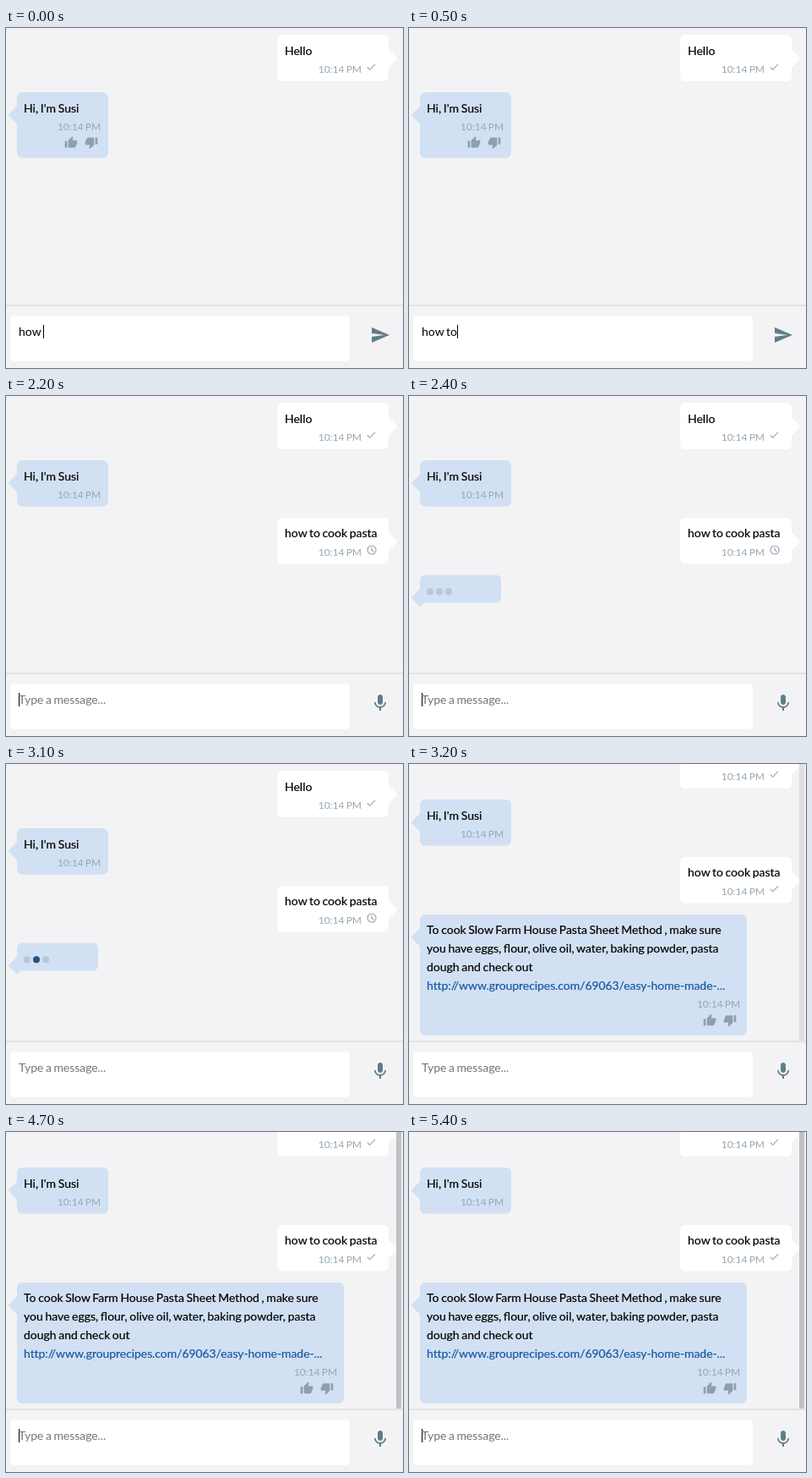
These frames come from a looping animation (470 by 402 pixels, 7.5 s). An HTML page:

```html
<!DOCTYPE html>
<html lang="en">
<head>
<meta charset="utf-8">
<title>Chat</title>
<style>
html, body { margin: 0; width: 100%; height: 100%; overflow: hidden; background: #f3f3f5; }
body { position: relative; font: 14px/20px Lato, sans-serif; word-spacing: -.95px; color: #000; }
svg { position: absolute; left: 0; top: 0; display: block; }
text { font: 14px Lato, sans-serif; fill: #000; stroke: #000; stroke-width: .2px; white-space: pre; }
.time { font-size: 12px; fill: #96a7b4; stroke: none; text-anchor: end; }
.bot { fill: #d1e0f3; }
.me { fill: #fff; }
.thumbs { fill: #8e9fae; }
.tick { fill: #94a5b1; }
.link { fill: #16599f; stroke: #16599f; letter-spacing: -.075px; }
.dot { fill: #b7c6d8; }
#input { position: absolute; left: 15px; top: 349px; height: 20px; white-space: pre; }
#hint { color: #757575; letter-spacing: -.05px; }
#caret { display: inline-block; width: 1px; height: 16px; margin-right: -1px; vertical-align: -3px; background: #000; }
</style>
</head>
<body>
<svg width="470" height="402" viewBox="0 0 470 402">
  <defs>
    <clipPath id="view"><rect width="470" height="327"/></clipPath>
    <rect id="tail" x="-7.5" y="-7.5" width="15" height="15" transform="rotate(45)"/>
    <g id="thumbs">
      <path transform="scale(.667)" d="M1 21h4V9H1v12zm22-11c0-1.1-.9-2-2-2h-6.31l.95-4.57.03-.32c0-.41-.17-.79-.44-1.06L14.17 1 7.59 7.59C7.22 7.95 7 8.45 7 9v10c0 1.1.9 2 2 2h9c.83 0 1.54-.5 1.84-1.22l3.02-7.05c.09-.23.14-.47.14-.73v-2z"/>
      <path transform="translate(24) scale(.667)" d="M15 3H6c-.83 0-1.54.5-1.84 1.22l-3.02 7.05c-.09.23-.14.47-.14.73v2c0 1.1.9 2 2 2h6.31l-.95 4.57-.03.32c0 .41.17.79.44 1.06L9.83 23l6.59-6.59c.36-.36.58-.86.58-1.41V5c0-1.1-.9-2-2-2zm4 0v12h4V3h-4z"/>
    </g>
    <path id="tick" transform="scale(.57)" d="M9 16.2L4.8 12l-1.4 1.4L9 19 21 7l-1.4-1.4L9 16.2z"/>
  </defs>

  <g clip-path="url(#view)">
    <g id="list">
      <g transform="translate(321 8)">
        <use href="#tail" class="me" transform="translate(132 28)"/>
        <rect class="me" width="132" height="55" rx="6"/>
        <text x="9" y="24">Hello</text>
        <text class="time" x="100" y="45">10:14 PM</text>
        <use href="#tick" class="tick" transform="translate(104.4 31.2)"/>
      </g>

      <g transform="translate(13 76)">
        <use href="#tail" class="bot" transform="translate(0 27)"/>
        <rect id="greet" class="bot" width="108" height="77.5" rx="6"/>
        <text x="8" y="24">Hi, I'm Susi</text>
        <text class="time" x="99.2" y="45">10:14 PM</text>
        <use id="greetThumbs" href="#thumbs" class="thumbs" transform="translate(56 51.5)"/>
      </g>

      <g id="question" transform="translate(321 144)">
        <use href="#tail" class="me" transform="translate(132 28)"/>
        <rect class="me" width="132" height="54.5" rx="6"/>
        <text x="9" y="23">how to cook pasta</text>
        <text class="time" x="100" y="44.5">10:14 PM</text>
        <g id="clock" transform="translate(112 38)" fill="none" stroke="#8e9fae" stroke-width="1.1">
          <circle r="5"/><path d="M0 -3V.3L2.4 1.7"/>
        </g>
        <use id="seen" href="#tick" class="tick" transform="translate(104.4 30.7)"/>
      </g>

      <g id="loader" transform="translate(13 211.5)">
        <use href="#tail" class="bot" transform="translate(0 27)"/>
        <rect class="bot" width="96" height="33" rx="6"/>
        <circle class="dot" cx="12" cy="19.7" r="4"/>
        <circle class="dot" cx="23" cy="19.7" r="4"/>
        <circle class="dot" cx="34" cy="19.7" r="4"/>
      </g>

      <g id="answer" transform="translate(13 212)">
        <use href="#tail" class="bot" transform="translate(0 27)"/>
        <rect class="bot" width="387" height="143" rx="6"/>
        <text x="8" y="23">To cook Slow Farm House Pasta Sheet Method , make sure</text>
        <text x="8" y="45">you have eggs, flour, olive oil, water, baking powder, pasta</text>
        <text x="8" y="67">dough and check out</text>
        <text class="link" x="8" y="89">http://www.grouprecipes.com/69063/easy-home-made-...</text>
        <text class="time" x="379.2" y="110">10:14 PM</text>
        <use href="#thumbs" class="thumbs" transform="translate(335 117.2)"/>
      </g>
    </g>
    <rect id="bar" x="462" y="-6" width="6" height="334" rx="3"/>
  </g>

  <rect y="327" width="470" height="2" fill="#e2e3e6"/>
  <rect x="5" y="340" width="402" height="54" rx="5" fill="#fff"/>
  <g transform="translate(431 351)" fill="#607d8b">
    <path id="send" d="M2.01 21L23 12 2.01 3 2 10l15 2-15 2z"/>
    <path id="mic" d="M12 14c1.66 0 2.99-1.34 2.99-3L15 5c0-1.66-1.34-3-3-3S9 3.34 9 5v6c0 1.66 1.34 3 3 3zm5.3-3c0 3-2.54 5.1-5.3 5.1S6.7 14 6.7 11H5c0 3.41 2.72 6.23 6 6.72V21h2v-3.28c3.28-.48 6-3.3 6-6.72h-1.7z"/>
  </g>
</svg>
<div id="input"><span id="typed"></span><i id="caret"></i><span id="hint">Type a message...</span></div>

<script>
const LOOP = 7500, SENT = 2200, LOADING = 2300, REPLY = 3200;
const PHRASE = 'how to cook pasta';
// [time, characters typed]
const KEYS = [[0, 4], [400, 5], [500, 6], [700, 7], [800, 8], [900, 9], [1300, 12],
  [1500, 13], [1700, 14], [1800, 15], [2000, 17], [SENT, 0]];
const $ = id => document.getElementById(id);
const dots = document.querySelectorAll('.dot');
const show = (id, on) => { $(id).style.display = on ? '' : 'none'; };
const clamp = v => Math.max(0, Math.min(1, v));

// Trapezoid pulse, full within 100 ms of its peak
const pulse = (t, peak) => clamp((300 - Math.abs(t - peak)) / 200);

function mix(k) {
  const dim = [183, 198, 216], lit = [38, 80, 128];
  return `rgb(${dim.map((d, i) => Math.round(d + (lit[i] - d) * k))})`;
}

function render(t) {
  const sent = t >= SENT, reply = t >= REPLY;
  const typed = KEYS.filter(k => k[0] <= t).pop()[1];
  $('typed').textContent = PHRASE.slice(0, typed);
  show('hint', sent);
  show('send', !sent);
  show('mic', sent);
  $('caret').style.opacity = t < 2700 || t >= 4700 ? 1 : 0;

  $('greet').setAttribute('height', sent ? 54.5 : 77.5);
  show('greetThumbs', !sent);
  show('question', sent);
  show('clock', !reply);
  show('seen', reply);
  show('loader', t >= LOADING && !reply);
  dots.forEach((d, i) => { d.style.fill = mix(pulse(t, 2750 + i * 350)); });

  show('answer', reply);
  $('list').setAttribute('transform', `translate(0 ${reply ? -34 : 0})`);
  show('bar', reply);
  $('bar').setAttribute('fill', t < 3600 ? '#dedfe2' : '#bfc1c4');
}

const start = performance.now();
function tick() {
  render((performance.now() - start) % LOOP);
  requestAnimationFrame(tick);
}
tick();
</script>
</body>
</html>
```
